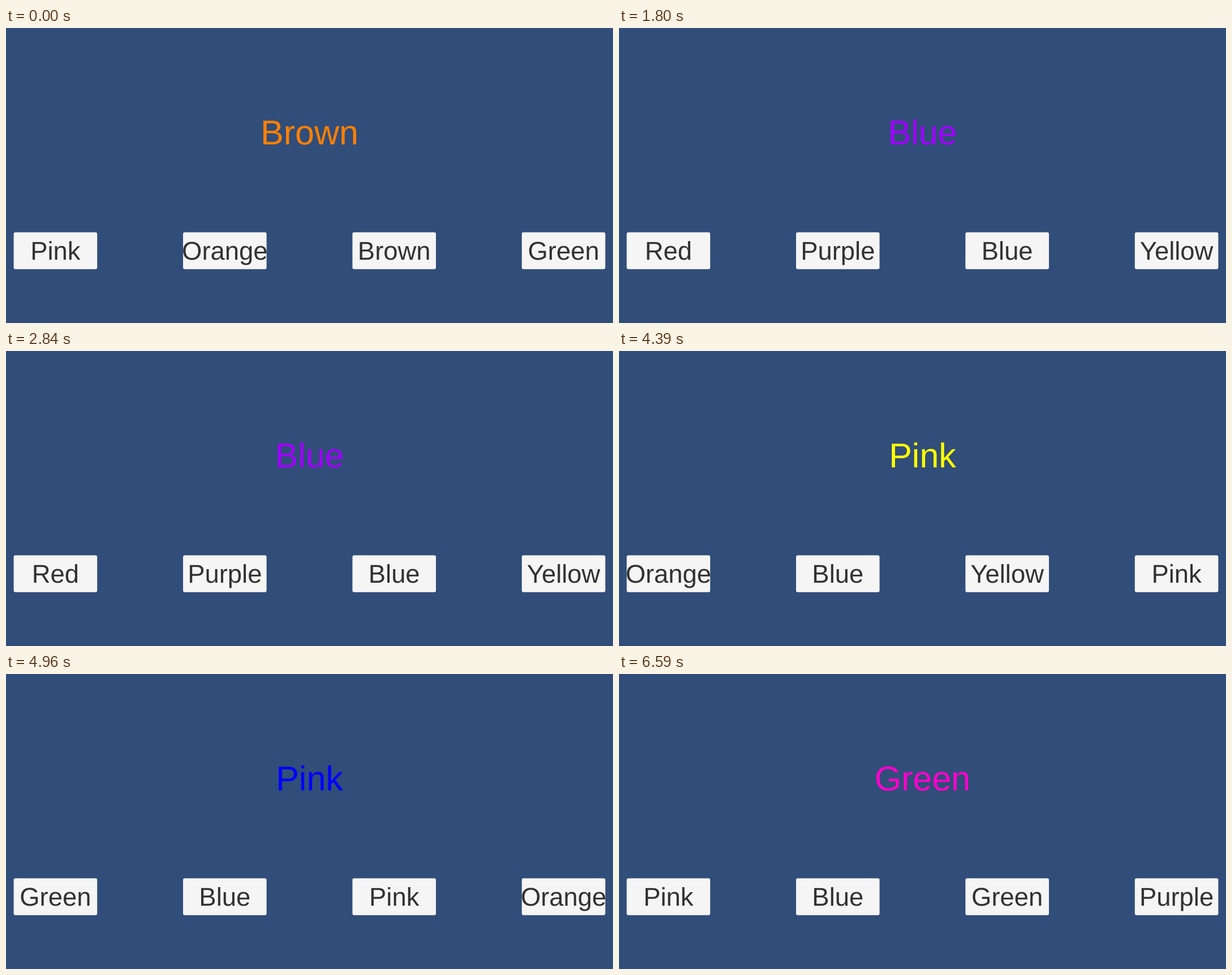
These frames come from a looping animation (1073x522 px, 8000 ms). An HTML page:

```html
<!DOCTYPE html>
<html lang="en">
<head>
<meta charset="utf-8">
<title>Colour words</title>
<style>
  html, body { margin: 0; width: 100%; height: 100%; overflow: hidden; background: #314d79; }
  svg { display: block; width: 1073px; height: 522px; }
  text {
    font-family: "Liberation Sans", Arial, sans-serif;
    text-anchor: middle;
    text-rendering: geometricPrecision;
    font-kerning: normal;
  }
  #word { font-size: 61px; }
  .label { font-size: 45.4px; fill: #323232; }
  .button { fill: #f5f5f5; }
</style>
</head>
<body>
<svg id="stage" viewBox="0 0 1073 522">
  <text id="word" x="536.5" y="205.5"></text>
</svg>
<script>
const LOOP = 8000;
const rounds = [
  { start: 0,    word: "Brown", color: "#ff8000", choices: ["Pink", "Orange", "Brown", "Green"] },
  { start: 500,  word: "Red",   color: "#ff00cc", choices: ["Purple", "Pink", "Blue", "Red"] },
  { start: 1800, word: "Blue",  color: "#a000ff", choices: ["Red", "Purple", "Blue", "Yellow"] },
  { start: 3540, word: "Pink",  color: "#ffff00", choices: ["Orange", "Blue", "Yellow", "Pink"] },
  { start: 4960, word: "Pink",  color: "#0000ff", choices: ["Green", "Blue", "Pink", "Orange"] },
  { start: 6590, word: "Green", color: "#ff00cc", choices: ["Pink", "Blue", "Green", "Purple"] },
];

const stage = document.getElementById("stage");
const word = document.getElementById("word");

function add(tag, attributes) {
  const node = document.createElementNS(stage.namespaceURI, tag);
  for (const [name, value] of Object.entries(attributes)) node.setAttribute(name, value);
  return stage.appendChild(node);
}

const labels = [0, 1, 2, 3].map(i => {
  const x = 13.6 + i * 299.4;
  add("rect", { class: "button", x, y: 361.5, width: 147.6, height: 65.3, rx: 3 });
  return add("text", { class: "label", x: x + 73.8, y: 410 });
});

let shown;
function show(round) {
  if (round === shown) return;
  shown = round;
  word.textContent = round.word;
  word.setAttribute("fill", round.color);
  labels.forEach((label, i) => { label.textContent = round.choices[i]; });
}

const origin = performance.now();
function tick() {
  const time = (performance.now() - origin) % LOOP;
  show(rounds.findLast(round => round.start <= time));
  requestAnimationFrame(tick);
}
tick();
</script>
</body>
</html>
```
